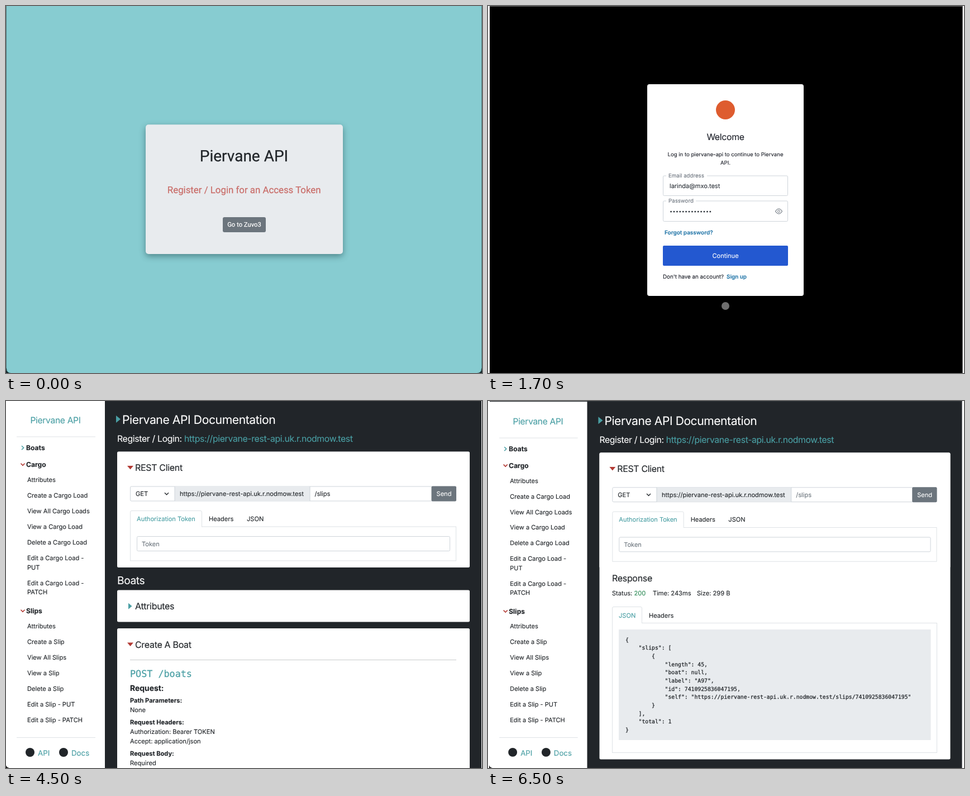
Animation of 852x657 px, one loop 8 s. Source, as an HTML page:

```html
<!DOCTYPE html>
<html lang="en">
<head>
<meta charset="utf-8">
<title>API walkthrough</title>
<style>
  html, body { margin: 0; width: 100%; height: 100%; overflow: hidden; background: #fff; }
  svg { display: block; width: 852px; height: 657px; }
  text { white-space: pre; font-optical-sizing: none; text-rendering: geometricPrecision; }
  .ui { font-family: Inter, "Open Sans", sans-serif; stroke-width: .12px; }
  .rb { font-family: Roboto, Arial, sans-serif; stroke-width: .25px; }
  .mono { font-family: "DejaVu Sans Mono", "Liberation Mono", monospace; stroke-width: .25px; }
  .lift { filter: drop-shadow(0 4px 6px rgba(0, 35, 40, .42)); }
</style>
</head>
<body>
<svg id="stage" viewBox="0 0 852 657" xmlns="http://www.w3.org/2000/svg"></svg>
<script>
const INK = '#212529', TEAL = '#4a9fa4', ROSE = '#c96d69', RED = '#b23a34';
const GRAY = '#6c757d', PALE = '#e8ebee', EDGE = '#ced4da', LINE = '#dee2e6';
const LINK = '#2376a8', SEA = '#87ccd1', BODY = 11.1;
const APP = 'Piervane API', LOGIN = 'Zuvo3', MAIL = 'larinda@mxo.test';
const HOST = 'https://piervane-rest-api.uk.r.nodmow.test';

// Drawing helpers
const rect = (x1, y1, x2, y2, fill, r = 0, extra = '') =>
  `<rect x="${x1}" y="${y1}" width="${x2 - x1}" height="${y2 - y1}" rx="${r}" fill="${fill}" ${extra}/>`;
const box = (x1, y1, x2, y2, r = 2, edge = EDGE) =>
  rect(x1 + .5, y1 + .5, x2 - .5, y2 - .5, '#fff', r, `stroke="${edge}"`);
const path = (d, stroke, w = 1) =>
  `<path d="${d}" fill="none" stroke="${stroke}" stroke-width="${w}"/>`;
const fillPath = (d, fill) => `<path d="${d}" fill="${fill}"/>`;
const dot = (x, y, r, fill) => `<circle cx="${x}" cy="${y}" r="${r}" fill="${fill}"/>`;

// A hairline stroke gives the slightly heavy look of smoothed type
const paint = c => `fill="${c}" stroke="${c}"`;
function text(str, x, y, size, fill = INK, o = {}) {
  return `<text class="${o.font || 'ui'}" x="${x}" y="${y}" font-size="${size}" ${paint(fill)}` +
    ` font-weight="${o.weight || 400}" text-anchor="${o.mid ? 'middle' : 'start'}"` +
    ` letter-spacing="${o.tight ? '-.02em' : '0'}">${str}</text>`;
}
const span = (str, fill) => `<tspan ${paint(fill)}>${str}</tspan>`;
const mid = { mid: true }, tight = { tight: true }, bold = { weight: 700 };
const semi = { weight: 600 }, rbMid = { font: 'rb', mid: true }, mono = { font: 'mono' };

const rightTri = (x, y, w, h) => fillPath(`M${x} ${y - h}l${w} ${h}l${-w} ${h}z`, TEAL);
const downTri = (x, y) => fillPath(`M${x} ${y}h11l-5.5 6.5z`, RED);
const chevron = (x, y, c, w = 1.6) => path(`M${x - 3.5} ${y - 1.8}l3.5 3.6l3.5 -3.6`, c, w);
const button = (x1, y1, x2, y2, label) =>
  rect(x1, y1, x2, y2, GRAY, 3) + text(label, (x1 + x2) / 2, y1 + 17.4, 11.25, '#fff', rbMid);

function landing() {
  return rect(0, 0, 852, 657, '#4f7478') +
    fillPath('M0 648V657H9zM852 648V657H843z', '#18292c') +
    fillPath('M1 0H851V649Q851 657 843 657H9Q1 657 1 649z', SEA) +
    rect(250, 212.3, 603, 444, PALE, 5, 'class="lift"') +
    text(APP, 426, 278.3, 28, INK, rbMid) +
    text('Register / Login for an Access Token', 426.2, 335, 16.84, ROSE, rbMid) +
    button(388, 378, 465, 405, 'Go to ' + LOGIN);
}

function field(y1, y2, label, gapEnd) {
  return box(313, y1, 537, y2) + rect(319, y1 - 1, gapEnd, y1 + 2, '#fff') +
    text(label, 323, y1 + 3, 9.7, '#6f7780');
}

function login() {
  let s = rect(0, 0, 852, 657, '#fff') + rect(3, 0, 849.5, 657, '#000') +
    rect(3, 0, 849.5, 1, '#666') + rect(285, 140, 565, 519, '#fff', 4) +
    dot(425, 186, 17, '#de5c2f') +
    text('Welcome', 425, 240, 15.8, '#1e212a', { mid: true, tight: true }) +
    text('Log in to piervane-api to continue to Piervane', 425, 269, 9.6, '#1e212a', mid) +
    text('API.', 425, 283.5, 9.6, '#1e212a', mid) +
    field(303.5, 340, 'Email address', 392) + text(MAIL, 325, 326, 11, '#2d333a') +
    field(348.5, 386, 'Password', 372);
  for (let i = 0; i < 14; i++) s += dot(327.6 + i * 5.4, 368.2, 1.35, '#2d333a');
  return s +
    path('M514.5 367.5Q520.5 358.5 526.5 367.5Q520.5 376.5 514.5 367.5z', '#6f7780', 1.1) +
    `<circle cx="520.5" cy="367.5" r="2" fill="none" stroke="#6f7780"/>` +
    text('Forgot password?', 316, 408.5, 10, LINK, semi) +
    rect(313, 429, 537, 465, '#2358d0', 2) + text('Continue', 425, 451, 11.1, '#fff', mid) +
    text("Don't have an account?", 313, 487.5, 9.8, '#1e212a') +
    text('Sign up', 427, 487.5, 9.9, LINK, semi) +
    dot(425, 537, 7, '#6e6e6e');
}

// Invented token text, the same on every load
function token() {
  const abc = 'ABCDEFGHIJKLMNOPQRSTUVWXYZabcdefghijklmnopqrstuvwxyz0123456789';
  let seed = 4711;
  const next = () => abc[(seed = seed * 16807 % 2147483647) % abc.length];
  const run = n => Array.from({ length: n }, next).join('');
  const lines = Array.from({ length: 8 }, () => run(100));
  lines[0] = run(76) + '.' + run(23);
  lines[7] = run(8) + '.' + run(4) + '_' + run(86);
  return [...lines, run(77) + '-', run(73) + '-', run(99)];
}

function userInfo() {
  return rect(0, 0, 852, 657, '#fff') + rect(2.5, 0, 849.5, 657, '#182629') +
    fillPath('M2.5 1.5H849.5V649Q849.5 656.5 842 656.5H10Q2.5 656.5 2.5 649z', '#88d0d4') +
    rect(36, 39.3, 817, 619, PALE, 5, 'class="lift"') +
    text('User Info', 426, 104.4, 28, ROSE, rbMid) +
    text(span('Email: ', ROSE) + MAIL, 426, 161, 16.8, INK, rbMid) +
    text(span('User ID: ', ROSE) + 'zuvo3|47d90ce2b51a76308c2e49f3', 426, 187, 16.8, INK, rbMid) +
    text('JWT:', 426.3, 243.3, 20, ROSE, rbMid) +
    token().map((t, i) => text(t, 89, 274 + i * 16.75, 11.18, INK, mono)).join('') +
    button(400, 493, 453, 520, 'Logout') + button(369, 553, 484, 580, 'API Documentation');
}

function sidebar() {
  const items = (list, y) => list.map((t, i) => text(t, 38, y + i * 28, BODY)).join('');
  const rule = y => path(`M19 ${y}H160`, LINE);
  return text(APP, 88.5, 40, 15.6, TEAL, { mid: true, tight: true }) + rule(64) +
    path('M28 80.2l3.6 3.5l-3.6 3.5', TEAL, 1.6) + text('Boats', 36, 88, 12.1, INK, bold) +
    chevron(30, 113.5, RED) + text('Cargo', 36, 118, 12.1, INK, bold) +
    items(['Attributes', 'Create a Cargo Load', 'View All Cargo Loads', 'View a Cargo Load',
      'Delete a Cargo Load', 'Edit a Cargo Load -'], 145) +
    text('PUT', 38, 301.7, BODY) + text('Edit a Cargo Load -', 38, 329.7, BODY) +
    text('PATCH', 38, 346.4, BODY) +
    chevron(30, 375.5, RED) + text('Slips', 36, 380, 12.1, INK, bold) +
    items(['Attributes', 'Create a Slip', 'View All Slips', 'View a Slip', 'Delete a Slip',
      'Edit a Slip - PUT', 'Edit a Slip - PATCH'], 406.7) +
    rule(602.5) + dot(43, 629, 8, INK) + text('API', 57, 635, 13.3, TEAL) +
    dot(103, 629, 8, INK) + text('Docs', 117, 635, 13.3, TEAL);
}

// Bordered panel with an open tab on its top left
const tabPanel = (tabEnd, top, mid, right, bottom) =>
  box(222, mid, right, bottom, 0, LINE) +
  path(`M222.5 ${mid + 1}V${top + 3}q0 -2.5 2.5 -2.5H${tabEnd - 3}q2.5 0 2.5 2.5V${mid + 1}`, LINE) +
  rect(223, mid - .5, tabEnd - 1, mid + 1.5, '#fff');

function client(slipsInk) {
  return rightTri(197, 32.5, 8, 6.5) +
    text(APP + ' Documentation', 208, 40.5, 21.15, '#fff', tight) +
    text('Register / Login: ' + span(HOST, TEAL), 199, 73, 15.75, '#fff', tight) +
    rect(199, 90.5, 830, 298, '#fff', 2.5) + downTri(217, 116) +
    text('REST Client', 231, 125, 16, INK, tight) +
    box(222, 152.5, 806, 179.5) + rect(302, 153, 544, 179, PALE) +
    path('M302 153V179M544 153V179', EDGE) + rect(761.5, 152.5, 806, 179.5, GRAY, 2) +
    text('GET', 232, 170, BODY) + chevron(287.5, 166, INK, 1.3) + text(HOST, 311, 170, BODY) +
    text('/slips', 552.5, 170, BODY, slipsInk) + text('Send', 784, 170, BODY, '#fff', mid) +
    tabPanel(351, 196, 224.5, 806, 286.5) +
    text('Authorization Token', 234, 214.7, BODY, TEAL) +
    text('Headers', 363, 214.7, BODY) + text('JSON', 431, 214.7, BODY) +
    box(234, 242, 795, 269) + text('Token', 243, 259.5, BODY, GRAY);
}

function docs() {
  const row = (str, y, o) => text(str, 222, y, BODY, INK, o);
  return rect(0, 0, 852, 657, '#fff') + rect(177, 0, 851, 657, INK) +
    fillPath('M0 652Q1 656 6 657H0z', '#111') + sidebar() + client(INK) +
    text('Boats', 199, 328, 19.2, '#fff', tight) +
    rect(199, 338.5, 830, 395.5, '#fff', 2.5) + rightTri(219, 367.3, 6.5, 5.5) +
    text('Attributes', 231, 373, 16, INK, tight) +
    rect(199, 407, 830, 665, '#fff', 2.5) + downTri(217, 432.5) +
    text('Create A Boat', 231, 441.5, 16, INK, tight) + path('M222 463.5H806', '#c8cacc') +
    text('POST /boats', 222, 494, 16.76, TEAL, mono) +
    text('Request:', 222, 519, 13.9, INK, bold) +
    row('Path Parameters:', 540, bold) + row('None', 556.6) +
    row('Request Headers:', 579, bold) + row('Authorization: Bearer TOKEN', 596) +
    row('Accept: application/json', 612.6) +
    row('Request Body:', 635, bold) + row('Required', 652);
}

function response() {
  const id = '7410925836047195';
  const json = JSON.stringify({
    slips: [{ length: 45, boat: null, label: 'A97', id: 0, self: `${HOST}/slips/${id}` }], total: 1
  }, null, 4).replace('"id": 0', '"id": ' + id).split('\n');
  const code = json.map((l, i) => {
    const body = l.trimStart();
    return text(body, 246 + (l.length - body.length) * 5.88, 430.5 + i * 14.67, 9.77, INK, mono);
  }).join('');
  return rect(0, 0, 852, 657, '#fff') + rect(177.5, 0, 848.5, 657, INK) +
    rect(3, 0, 848.5, 1.2, '#2a2e32') + fillPath('M2 652Q3 656 8 657H2z', '#111') +
    rect(199.5, 92.5, 827.5, 641.5, '#fff', 2.5) +
    `<g transform="matrix(.9952 0 0 .996 1.4 2.4)">${sidebar() + client(GRAY)}</g>` +
    text('Response', 222, 323, 16, INK, tight) +
    text('Status: ' + span('200', '#2e8b57'), 222, 347.5, BODY) +
    text('Time: 243ms', 295, 347.5, BODY) + text('Size: 299 B', 374, 347.5, BODY) +
    tabPanel(276, 368, 397, 804, 630) +
    text('JSON', 234, 387.5, BODY, TEAL) + text('Headers', 288, 387.5, BODY) +
    rect(234, 409, 792.5, 607, PALE) + code;
}

const LOOP = 8000;
const scenes = [[0, landing], [500, login], [2500, userInfo], [4500, docs], [6500, response]];
const stage = document.getElementById('stage');
stage.innerHTML = scenes.map(([, draw]) => `<g display="none">${draw()}</g>`).join('');
const groups = [...stage.children];
const start = performance.now();
let shown = -1;

function tick() {
  const t = (performance.now() - start) % LOOP;
  const now = scenes.filter(([at]) => at <= t).length - 1;
  if (now !== shown) {
    groups.forEach((g, i) => g.setAttribute('display', i === now ? 'inline' : 'none'));
    shown = now;
  }
  requestAnimationFrame(tick);
}
tick();
</script>
</body>
</html>
```
